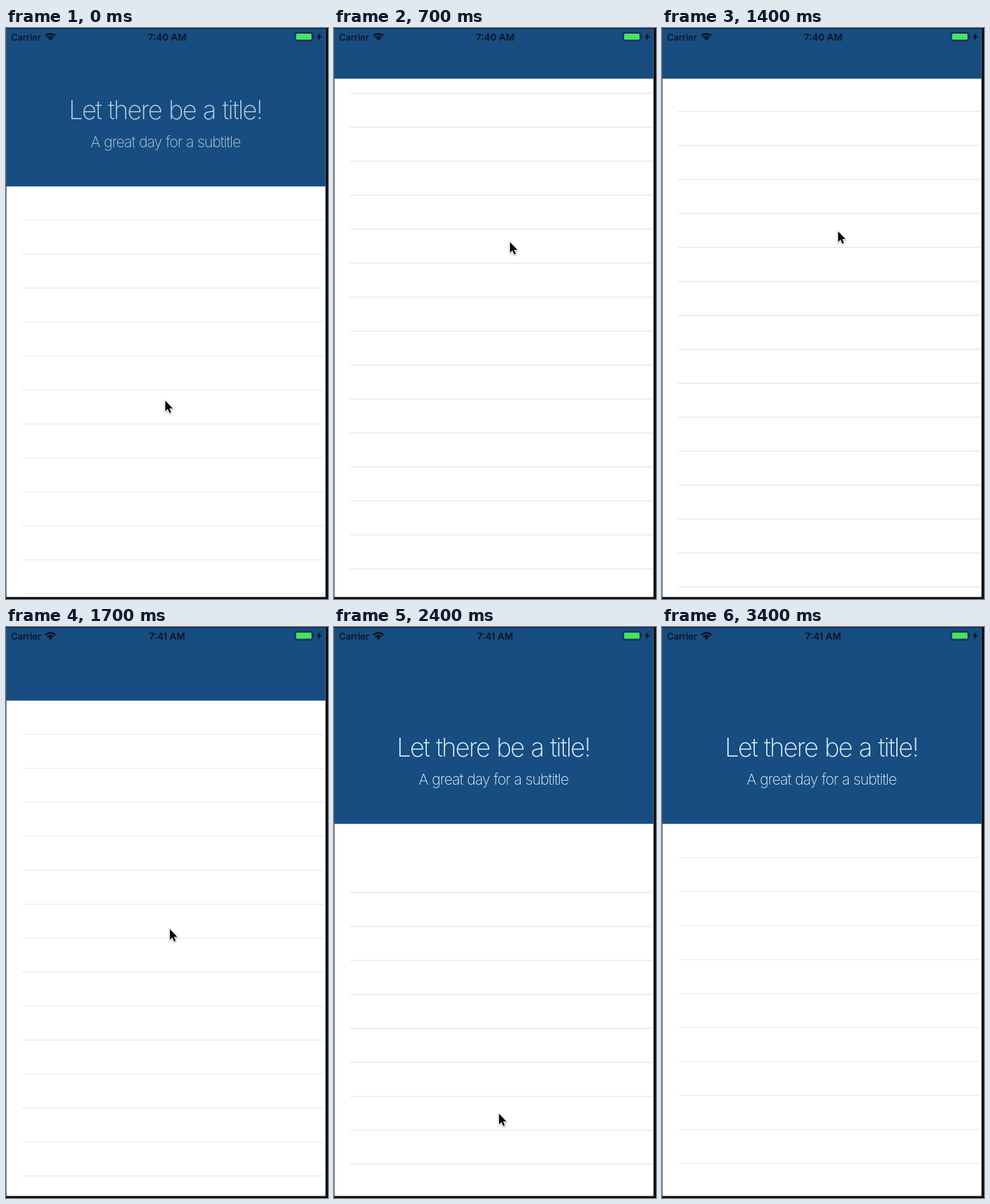
An HTML page that plays this animation: 562 by 996 pixels, repeating every 4 s.

```html
<!DOCTYPE html>
<html lang="en">
<head>
<meta charset="utf-8">
<title>Collapsing header</title>
<style>
  html, body { margin: 0; width: 100%; height: 100%; overflow: hidden; background: #0d0e10; }
  svg { display: block; }
  text { font-family: Inter, Roboto, sans-serif; font-optical-sizing: none; }
  #heading { fill: #e4f4ff; text-anchor: middle; font-weight: 200; }
  #title { font-size: 44.6px; letter-spacing: -.048em; word-spacing: .04em; }
  #subtitle { font-size: 26px; letter-spacing: -.044em; word-spacing: .03em; }
  #status { fill: #09131e; font-size: 16.5px; }
  #carrier { font-weight: 500; letter-spacing: -.02em; }
  #clock { font-weight: 600; text-anchor: middle; }
</style>
</head>
<body>
<svg width="562" height="996" viewBox="0 0 562 996">
  <rect x=".7" y="1" width="556.9" height="991.5" fill="#fff"/>
  <path id="rows" stroke="#e2e2e4" stroke-width="1.2"/>
  <rect id="header" x=".7" y="1" width="556.9" fill="#174d80"/>
  <g id="heading">
    <text id="title" x="278" y="-117.5">Let there be a title!</text>
    <text id="subtitle" x="278.5" y="-68">A great day for a subtitle</text>
  </g>
  <g id="status">
    <text id="carrier" x="8.5" y="21.5">Carrier</text>
    <path d="M69 13.6a12.2 12.2 0 0 1 17 0M72.4 17.3a7.3 7.3 0 0 1 10.2 0"
      fill="none" stroke="#09131e" stroke-width="3"/>
    <path d="M74.2 19.2a4.7 4.7 0 0 1 6.6 0L77.5 22.6Z"/>
    <text id="clock" x="281.2" y="21.5"></text>
    <rect x="504.2" y="7.8" width="31" height="14.6" rx="4" fill="#174d80" stroke="#0b2540" stroke-width="1.5"/>
    <rect x="506.3" y="10" width="26.8" height="10.2" rx="2" fill="#48e35d"/>
    <path d="M537 12.6q2.2 2.5 0 5ZM549 7.5L542 16h4l-2.3 7L551.3 13.6h-4.3Z"/>
  </g>
  <path id="cursor" d="M0 0V18.5L4.2 14.5L7.4 21.5L10.2 20.3L7.2 13.4H13Z"
    fill="#080808" stroke="#fff" stroke-width="2.4" paint-order="stroke"
    style="filter:drop-shadow(0 1px 1px #0006)"/>
</svg>
<script>
const STEP = 100, LOOP = 4000, ROW = 59.25, BOTTOM = 992;
const MIN = 88, MAX = 343;
const RELEASE = 2500, BOUNCE = 300, LEAVE = 2900, GONE = 3400;
const $ = id => document.getElementById(id);

const clamp = (v, lo, hi) => Math.min(hi, Math.max(lo, v));
const mix = (a, b, f) => a + (b - a) * f;
const linear = u => u;
const smooth = u => u * u * (3 - 2 * u);
const cubic = u => u < .5 ? 4 * u ** 3 : 1 - 4 * (1 - u) ** 3;

// Drag up, then down past the limit; ease leads to the next point.
const drag = [
  { at: 0, x: 278, y: 650, table: 276, ease: cubic },
  { at: 1200, x: 319, y: 261, table: -119, ease: smooth },
  { at: 1700, x: 286, y: 527, table: 128, ease: linear },
  { at: 2000, x: 288, y: 649, table: 255, ease: linear },
  { at: 2400, x: 288, y: 849, table: 461 }
];

function dragAt(t) {
  const i = drag.findIndex(p => p.at > t);
  if (i < 0) return drag.at(-1);
  const a = drag[i - 1], b = drag[i];
  const f = a.ease((t - a.at) / (b.at - a.at));
  return { x: mix(a.x, b.x, f), y: mix(a.y, b.y, f), table: mix(a.table, b.table, f) };
}

// Overscroll resists the drag and springs back after release.
function tableTop(raw, t) {
  if (raw <= MAX) return raw;
  const stretch = BOTTOM * (1 - 1 / ((raw - MAX) * .55 / BOTTOM + 1));
  const back = clamp((t - RELEASE) / BOUNCE, 0, 1);
  return MAX + stretch * (1 - back) ** 2;
}

function draw(now) {
  const t = Math.floor(now % LOOP / STEP) * STEP;
  const { x, y, table } = dragAt(t);
  const top = tableTop(table, t);
  const edge = clamp(top, MIN, MAX);
  const exit = clamp((t - LEAVE) / (GONE - STEP - LEAVE), 0, 1);

  let d = "";
  for (let row = top + ROW; row < BOTTOM; row += ROW)
    if (row > edge) d += `M28 ${row}H557.5`;
  $("rows").setAttribute("d", d);

  $("header").setAttribute("height", edge - .6);
  $("heading").setAttribute("transform", `translate(0 ${edge})`);
  $("heading").setAttribute("opacity", clamp((edge - 150) / 160, 0, 1));
  $("clock").textContent = t < 1500 ? "7:40 AM" : "7:41 AM";
  $("cursor").setAttribute("transform", `translate(${mix(x, 189, exit)} ${mix(y, 102, exit)})`);
  $("cursor").setAttribute("visibility", t < GONE ? "visible" : "hidden");
}

const start = performance.now();
function tick() {
  draw(performance.now() - start);
  requestAnimationFrame(tick);
}
tick();
</script>
</body>
</html>
```
